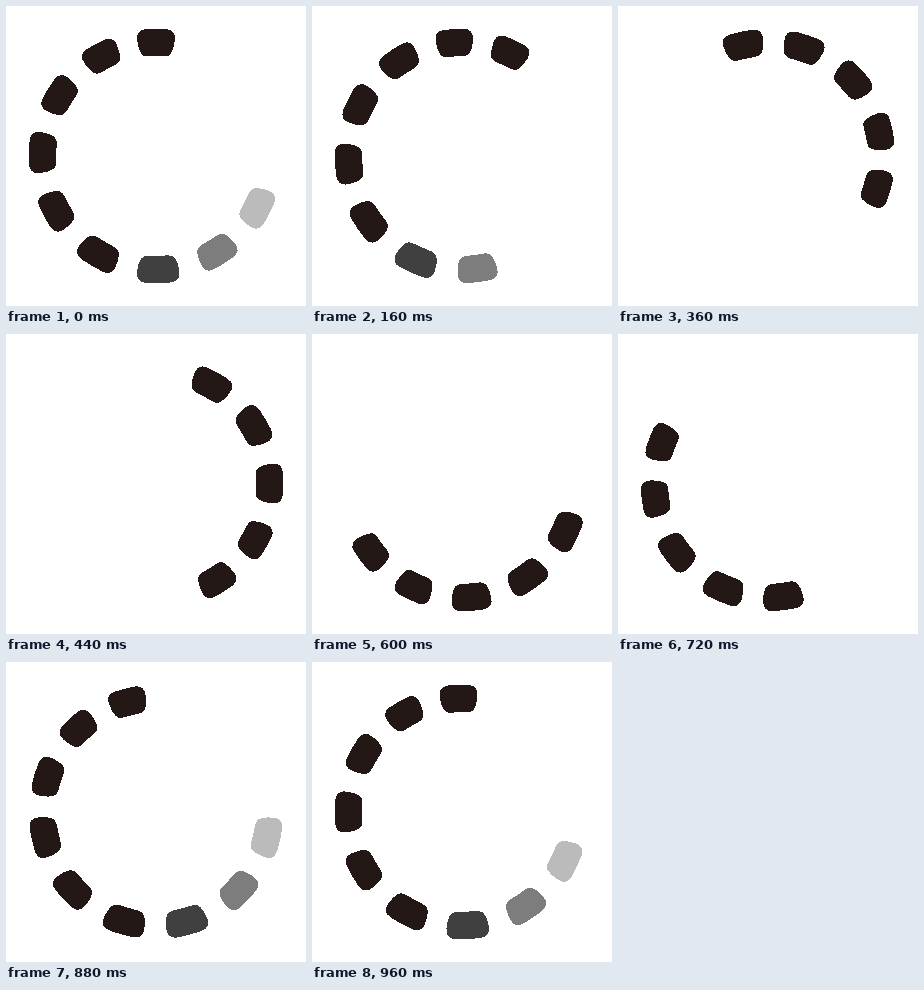
An HTML page without scripts that plays this animation: 300x300 px, repeating every 1000 ms.

```html
<!DOCTYPE html>
<html lang="en">
<head>
<meta charset="utf-8">
<title>Loading ring</title>
<style>
@property --k {
  syntax: "<number>";
  inherits: true;
  initial-value: 0;
}
html, body {
  margin: 0;
  width: 100%;
  height: 100%;
  overflow: hidden;
  background: #fff;
}
svg {
  display: block;
  width: 100%;
  height: 100%;
}
/* --k counts 25 ticks per turn; the angle follows 3u² - 2u³ */
.ring {
  --u: calc(var(--k) / 25);
  fill: #231815;
  shape-rendering: crispEdges;
  transform: rotate(calc(360deg * var(--u) * var(--u) * (3 - 2 * var(--u))));
  animation: tick 1s steps(25) -1ms infinite;
}
@keyframes tick {
  from { --k: 0; }
  to { --k: 25; }
}
.ring use {
  transform: rotate(var(--a)) scaleX(var(--w));
}
/* tail blocks show only while --k is far enough from mid-turn */
.tail {
  opacity: clamp(0, (max(var(--k) - 12.5, 12.5 - var(--k)) - var(--gap)) * 99, 1);
}
</style>
</head>
<body>
<svg viewBox="0 0 300 300">
  <defs>
    <path id="block" d="M-11-126.8Q0-127.6 11-126.8C18-126.2 20.6-122 19.8-116C19.2-110 17.8-106 16.2-103.3Q14.2-99.6 9-99.6Q0-100-9-99.6Q-14.2-99.6-16.2-103.3C-17.8-106-19.2-110-19.8-116C-20.6-122-18-126.2-11-126.8Z"/>
  </defs>
  <g transform="translate(150 150)">
    <g class="ring">
      <use href="#block" style="--a:0deg;--w:.95"/>
      <use href="#block" style="--a:-28.5deg;--w:.94"/>
      <use href="#block" style="--a:-58deg;--w:1"/>
      <use href="#block" style="--a:-88.3deg;--w:1.03"/>
      <use href="#block" style="--a:-118.7deg;--w:1.02"/>
      <use href="#block" class="tail" style="--a:-149.7deg;--w:1.06;--gap:6"/>
      <use href="#block" class="tail" style="--a:-181.1deg;--w:1.07;--gap:7" fill="#404040"/>
      <use href="#block" class="tail" style="--a:-212.3deg;--w:1.01;--gap:8" fill="#7d7d7d"/>
      <use href="#block" class="tail" style="--a:-243deg;--w:1.02;--gap:9" fill="#bbb"/>
    </g>
  </g>
</svg>
</body>
</html>
```
